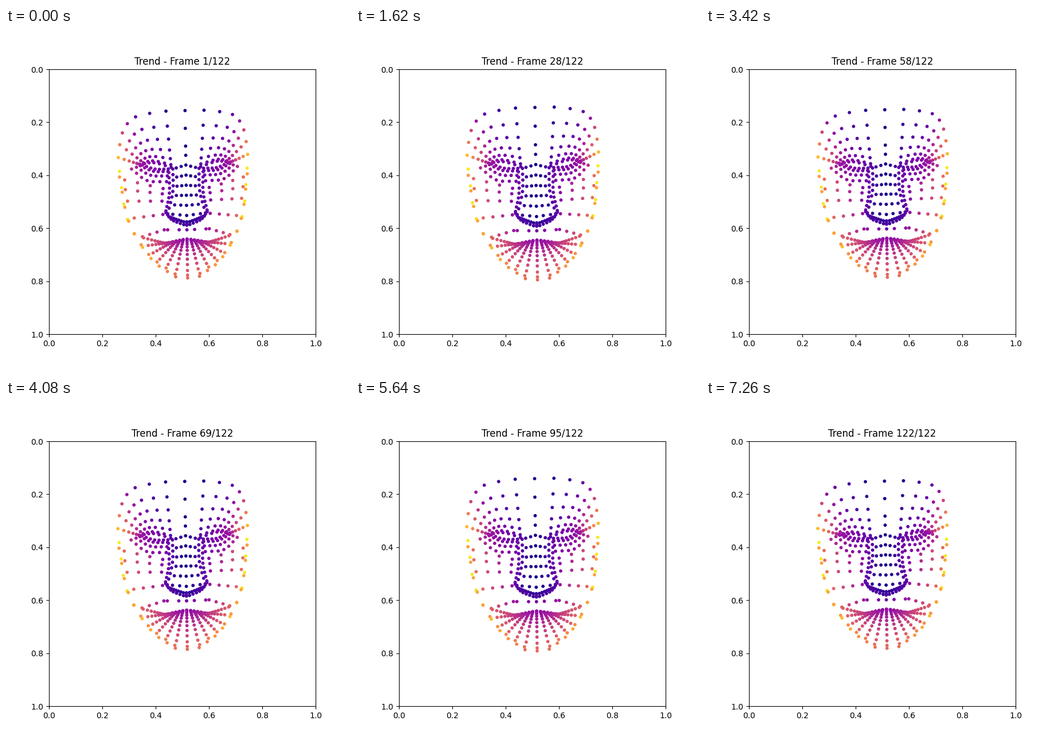
A matplotlib script for the animation above (7320 ms loop, 600 px wide and 600 px high).

```python
import numpy as np
import matplotlib.pyplot as plt
from matplotlib.animation import FuncAnimation

FRAMES, STEP = 122, 60


def curve(n, *knots):
    """Sample n points (x, y, depth) on a Catmull-Rom curve through the knots."""
    k = np.array(knots, float)
    p = np.vstack([2 * k[0] - k[1], k, 2 * k[-1] - k[-2]])
    s = np.linspace(0, len(k) - 1, n)
    i = np.minimum(s.astype(int), len(k) - 2)
    t = (s - i)[:, None]
    a, b, c, d = p[i], p[i + 1], p[i + 2], p[i + 3]
    return b + t / 2 * (c - a + t * (2 * a - 5 * b + 4 * c - d
                                     + t * (3 * (b - c) + d - a)))


def loft(start, end, rows, power=1.0, skip=0):
    """Rows of points blended from one curve to another, denser at the start."""
    t = np.linspace(0, 1, rows)[skip:, None, None] ** power
    return (start + (end - start) * t).reshape(-1, 3)


def axis(y):
    return 312.3 + (y - 144) * 4.5 / 292


def lid_line(u):
    return 244 - .15 * (np.abs(u) - 30)


# Left half of the face, as webs between pairs of contours
crown = curve(7, (279, 145, .03), (226, 155, .17), (203, 183, .48), (196, 226, .82))
jaw = curve(10, (198, 250, .94), (212, 334, .91), (253, 402, .78), (296, 434, .62))
jaw_inner = curve(10, (198, 260, .75), (214, 337, .77), (249, 395, .71), (295, 429, .62))
upper_lid = curve(7, (288, 243, .16), (258, 235, .25), (234, 238, .32))
lower_lid = curve(7, (283, 246, .17), (260, 246, .24), (238, 239, .30))
eye_bag = curve(7, (280, 268, .22), (246, 266, .30), (219, 246, .40))
cheek = curve(5, (207, 265, .60), (212, 302, .61), (238, 364, .56))
nose_side = curve(5, (274, 280, .26), (272, 302, .27), (276, 352, .32))
bridge = curve(6, (314, 239, .01), (316, 327, .01))
slope = curve(6, (297, 244, .09), (298, 284, .07), (291, 325, .07))
wing_in = curve(9, (291, 246, .15), (291, 285, .13), (282, 324, .14))
wing_out = curve(9, (284, 252, .21), (285, 288, .19), (279, 319, .18))
nostril = curve(8, (279, 322, .17), (290, 335, .14), (310, 343, .09))
nostril_in = curve(8, (284, 329, .14), (295, 333, .11), (310, 338, .06))
lip = curve(6, (309, 369, .28), (294, 372, .34), (279, 376, .44))
chin = curve(6, (298, 421, .56), (262, 398, .56), (240, 366, .56))

half = np.vstack([
    loft(upper_lid, crown, 7, 1.7),
    loft(lower_lid, eye_bag, 4, 1.5),
    loft(jaw, jaw_inner, 2),
    loft(cheek, nose_side, 4),
    loft(bridge, slope, 3, skip=1),
    loft(wing_in, wing_out, 2),
    loft(nostril, nostril_in, 2),
    loft(lip, chin, 11, 2),
    curve(2, (302, 352, .24), (282, 352, .30)),
])

# The far side is foreshortened and lifted a little by the head's tilt.
mirror = half.copy()
u = axis(half[:, 1]) - half[:, 0]
mirror[:, 0] = axis(half[:, 1]) + u * (1 - 6e-6 * u * u)
mirror[:, 1] -= .048 * u

y = np.r_[np.linspace(144, 206, 3), 222, np.linspace(239, 327, 6),
          np.linspace(338, 344, 3), 352,
          368 + 55 * np.linspace(0, 1, 11) ** 2, 431, 436]
z = np.interp(y, [327, 352, 368, 399, 436], [.01, .20, .29, .42, .61])
middle = np.column_stack([axis(y), y, z])

X, Y, Z = np.vstack([half, mirror, middle]).T
U = X - axis(Y)
T = (Y - 144) / 292
LID = lid_line(U) - .048 * np.maximum(U, 0) - Y
LID_PULL = .8 * np.exp(-(LID / 9) ** 2) * (np.abs(np.abs(U) - 55) < 32)


def points(i):
    drift = i / FRAMES
    nod = .5 - .5 * np.cos(4 * np.pi * drift)
    top, bottom = -5 * nod - 2.5 * drift, 4 * nod - 3 * drift
    relief = 2.5 * nod - 1.5 * drift
    blink = np.exp(-((i - 39) / 1.8) ** 2) + .5 * np.exp(-((i - 121) / 1.8) ** 2)
    x = X - drift + 2 * nod * U / 115
    y = (Y + top + (bottom - top) * T + LID * LID_PULL * blink
         + relief * (1 - 2 * Z) * np.sin(np.pi * T))
    return np.column_stack([(x - 75) / 465, (y - 72) / 462])


fig, ax = plt.subplots(figsize=(6, 6), dpi=100)
ax.set_xlim(0, 1)
ax.set_ylim(1, 0)
dots = ax.scatter(*points(0).T, c=Z, cmap="plasma", vmin=0, vmax=.97, s=10)
title = ax.set_title("")


def update(i):
    dots.set_offsets(points(i))
    title.set_text(f"Trend - Frame {i + 1}/{FRAMES}")
    return dots, title


anim = FuncAnimation(fig, update, frames=FRAMES, interval=STEP,
                     repeat=True, repeat_delay=0, blit=False)
plt.show()
```
